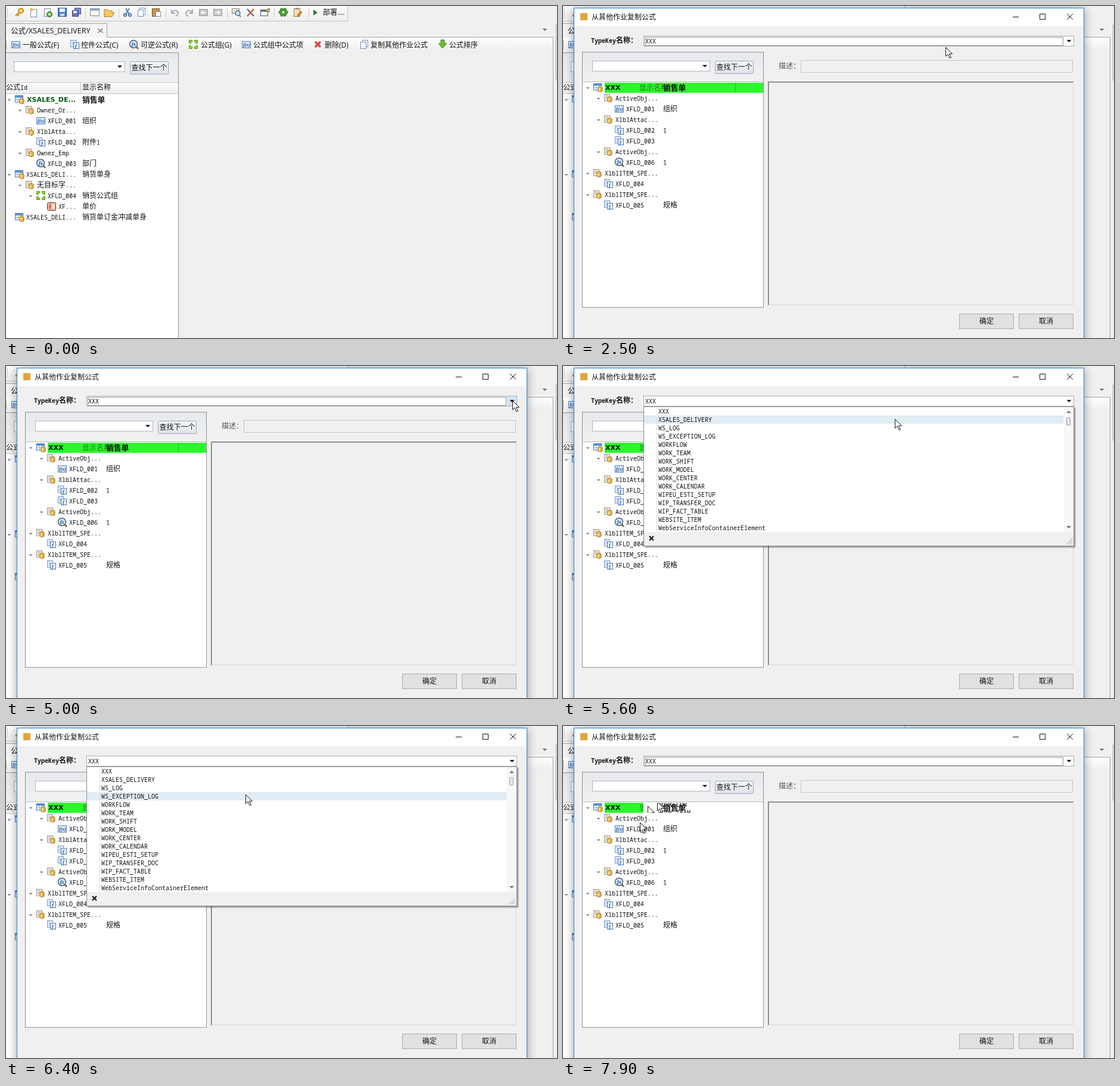
Write an HTML page that moves like this. It is 925 px wide and 558 px high and loops after 8 s.

```html
<!DOCTYPE html>
<html lang="zh">
<head>
<meta charset="utf-8">
<title>公式</title>
<style>
html,body{margin:0;width:100%;height:100%;overflow:hidden;background:#f0f0f0}
svg{display:block;width:925px;height:558px}
text{font:12px 'Open Sans','Noto Sans CJK SC','Noto Sans CJK',sans-serif;fill:#111;white-space:pre}
.mono{font-family:'Noto Sans Mono','Noto Sans CJK SC','Noto Sans CJK',monospace}
.mono .a{font-size:10px}
.semi{font-weight:600}
.bold{font:bold 11px 'DejaVu Sans',sans-serif}
.green{fill:#0a5a12}
.dim{fill:#555}
.under{fill:#157d1b}
.cjkb{font-weight:bold;font-size:12.8px}
.tab{font-size:12.6px}
.fx{font:italic bold 8px 'Liberation Serif',serif;fill:#1c4f94}
.shadow{filter:drop-shadow(0 2px 8px rgba(0,0,0,.38))}
.drop{filter:drop-shadow(2px 2px 1px rgba(0,0,0,.4))}
</style>
</head>
<body>
<svg id="stage" viewBox="0 0 925 558">
<defs>
<linearGradient id="bar" x2="0" y2="1"><stop stop-color="#fdfdfd"/><stop offset="1" stop-color="#ededee"/></linearGradient>
<linearGradient id="pane" x2="0" y2="1"><stop stop-color="#e6e9ec"/><stop offset="1" stop-color="#f1f1f2"/></linearGradient>
<linearGradient id="btn" x2="0" y2="1"><stop stop-color="#f5f6f8"/><stop offset="1" stop-color="#dfe3ea"/></linearGradient>
<linearGradient id="hotFill" x2="0" y2="1"><stop stop-color="#c4dcf5"/><stop offset="1" stop-color="#9cc5f0"/></linearGradient>
<clipPath id="rowClip"><rect x="33" y="149" width="255" height="17"/></clipPath>
<clipPath id="dlgRowClip"><rect x="135" y="129" width="90" height="17"/></clipPath>
<clipPath id="listClip"><rect x="136" y="69" width="704" height="210"/></clipPath>
</defs>
</svg>
<script>
const rect = (x, y, w, h, fill, extra = '') =>
  `<rect x="${x}" y="${y}" width="${w}" height="${h}" fill="${fill}" ${extra}/>`;
const box = (x, y, w, h, fill, stroke, extra = '') =>
  rect(x + .5, y + .5, w - 1, h - 1, fill, `stroke="${stroke}" ${extra}`);
const path = (d, fill = 'none', stroke = 'none', w = 1) =>
  `<path d="${d}" fill="${fill}" stroke="${stroke}" stroke-width="${w}"/>`;
const line = (d, color, w = 1) => path(d, 'none', color, w);
const circle = (x, y, r, fill, stroke = 'none', w = 1) =>
  `<circle cx="${x}" cy="${y}" r="${r}" fill="${fill}" stroke="${stroke}" stroke-width="${w}"/>`;
const text = (x, y, s, cls = '', extra = '') => `<text x="${x}" y="${y}" class="${cls}" ${extra}>${s}</text>`;
const mono = (x, y, s, cls = '') =>
  text(x, y, s.replace(/[ -~]+/g, m => `<tspan class="a">${m}</tspan>`), 'mono ' + cls);
const at = (x, y, s) => `<g transform="translate(${x} ${y})">${s}</g>`;
const group = (id, s) => `<g id="${id}">${s}</g>`;
const clip = (id, s) => `<g clip-path="url(#${id})">${s}</g>`;
const down = (x, y, color, r = 4) => path(`M${x - r} ${y - r / 2}h${2 * r}l${-r} ${r}z`, color);
const dotted = (x, y, w, h) => box(x, y, w, h, 'none', '#222', 'stroke-dasharray="1 1"');
const sheet = (x, y, w, h, stroke = '#6d8dbd') => box(x, y, w, h, '#fff', stroke);
const cylinder = (x, y) => at(x, y, path('M0 2q3.5-4 7 0v6q-3.5 3-7 0z', '#e8b640', '#9c6c1c') + rect(1, 3, 2, 5, '#ffe9a0'));
const rules = (x, y, w, n, color) => Array.from({length: n}, (_, i) => rect(x, y + 2 * i, w, 1, color)).join('');

const icon = {};
icon.table = box(0, 1, 14, 12, '#fff', '#4879b8') + rect(1, 2, 12, 3, '#5b95d8') +
  line('M5.5 5v8M9.5 5v8M1 8.5h12', '#86a9d3') + cylinder(8, 6);
icon.obj = sheet(0, 1, 10, 12, '#9a8a70') + rules(2, 3, 5, 4, '#b4a486') + cylinder(6, 5);
icon.fn = box(0, 2, 15, 12, '#deecfb', '#4f80bd') + text(2, 10.5, 'f(x)', 'fx');
icon.ctl = sheet(0, 0, 10, 12) + rules(2, 2, 4, 4, '#9dbbe0') + box(5, 4, 10, 11, '#e8f2fd', '#4377b5') + text(8, 13, 'f', 'fx');
icon.rev = line('M11 11l4 4', '#8a6a3c', 3) + circle(7, 7, 6.5, '#cfe0f3', '#56657a', 1.5) + text(4, 10, 'fx', 'fx');
icon.grp = [0, 9].map(x => [0, 9].map(y => box(x, y, 6, 6, '#8ccb3c', '#5b9f1d') +
  rect(x || 4, y || 4, 2, 2, '#fff')).join('')).join('');
icon.item = box(0, 1, 15, 14, '#e9c6a8', '#4e2a22', 'rx="2"') + rect(3, 4, 4, 8, '#d9756a') + rect(8, 4, 4, 8, '#f6e3b8');
icon.del = line('M2 3l9 9M11 3l-9 9', '#d8412f', 3.2);
icon.copy = sheet(3, 0, 10, 12) + sheet(0, 3, 10, 12);
icon.sort = path('M4 0h6v6h4l-7 8-7-8h4z', '#6dbb2d', '#3f8a16');
icon.save = box(0, 0, 15, 15, '#4d7fd0', '#27499a') + rect(3, 1, 9, 6, '#eaf2ff') + rect(4, 10, 7, 4, '#d5dcea');
icon.saves = at(4, 0, box(0, 0, 11, 11, '#8b8fd6', '#3f459a')) + at(0, 4, box(0, 0, 11, 11, '#6b70bd', '#3f459a') + rect(2, 1, 6, 4, '#eef'));
icon.page = sheet(2, 2, 11, 14) + circle(4, 3, 2.5, '#f2b632');
icon.plus = sheet(1, 1, 11, 14) + circle(10, 11, 4.5, '#53a93b', '#2e7420') + line('M7.5 11h5M10 8.5v5', '#fff', 1.5);
icon.key = line('M7 8l-6 6M4 11l3 2', '#d79a25', 3) + circle(10, 5, 4, '#f9dc7b', '#c98a1e', 2);
icon.win = box(0, 1, 16, 13, '#fff8df', '#7c8699') + rect(1, 2, 14, 3, '#8caedd');
icon.folder = path('M0 3h6l2 2h5v3h4l-4 7H0z', '#f5c95a', '#aa7c20');
icon.cut = line('M4 1l6 10M10 1L4 11', '#4470a8', 1.6) + [3, 11].map(x => circle(x, 12, 2.2, 'none', '#2f5ea8', 1.6)).join('');
icon.paste = box(0, 1, 13, 14, '#c99546', '#7c5720') + sheet(6, 6, 9, 9);
icon.undo = line('M2 3v6h6M2 9q7-9 11 0q0 3-4 5', '#a9a9ad', 2);
icon.back = box(0, 2, 15, 12, '#c3c3c5', '#a0a0a3') + line('M12 8H4M7 5L4 8l3 3', '#fff', 2);
icon.find = box(0, 1, 13, 9, '#f6e4a7', '#7b8db1') + circle(10, 9, 4, '#cfe3fa', '#3a6cb4', 1.5) + line('M12 12l3 3', '#a86b23', 2);
icon.tools = line('M2 2l11 12', '#5b6c86', 2.5) + line('M13 2L2 14', '#d15b3c', 2.5);
icon.props = sheet(0, 3, 13, 11, '#46546d') + rect(1, 4, 11, 3, '#5f86c5') + path('M7 5l8-4v6z', '#edbd62', '#725226');
icon.flower = Array.from({length: 6}, (_, i) =>
  circle(7.5 + 5 * Math.cos(i * Math.PI / 3), 7.5 + 5 * Math.sin(i * Math.PI / 3), 2.5, '#4dac32', '#2d7a1b')).join('') + circle(7.5, 7.5, 2, '#d9f3bd');
icon.clip = box(1, 1, 11, 14, '#f3e2bd', '#a37228') + rect(4, 0, 5, 3, '#8d98ab') + path('M7 12l6-6 2 2-6 6z', '#e8963a', '#8d5417');
icon.play = path('M0 3l7 5-7 5z', '#2c7a36');
const mirrored = name => `<g transform="matrix(-1 0 0 1 15 0)">${icon[name]}</g>`;
icon.redo = mirrored('undo');
icon.next = mirrored('back');
const put = (name, x, y) => at(x, y, icon[name]);

// Row: "level icon id label", a leading + marks an expanded node
function tree(rows, dx, y0, labelX) {
  return rows.trim().split('\n').map((row, i) => {
    const [, open, level, ic, id, label = ''] = row.trim().match(/^(\+?)(\d) (\S+) (\S+) ?(.*)$/);
    const y = y0 + 18 * i, x = dx + 18 * level;
    return (open ? down(x + 5.5, y + 1, '#7d7d7d', 3) : '') + put(ic, x + 15, y - 8) +
      (i ? mono(x + 34, y + 4, id) + mono(labelX, y + 4, label)
         : text(x + 35, y + 4, id, dx ? 'bold' : 'bold green') + text(labelX, y + 5, label, 'cjkb'));
  }).join('');
}
const mainRows = `
+0 table XSALES_DE... 销售单
+1 obj Owner_Or...
2 fn XFLD_001 组织
+1 obj XlblAtta...
2 ctl XFLD_002 附件1
+1 obj Owner_Emp
2 rev XFLD_003 部门
+0 table XSALES_DELI... 销货单身
+1 obj 无目标字...
+2 grp XFLD_004 销货公式组
3 item XF... 单价
0 table XSALES_DELI... 销货单订金冲减单身`;
const dialogRows = `
+0 table XXX 销售单
+1 obj ActiveObj...
2 fn XFLD_001 组织
+1 obj XlblAttac...
2 ctl XFLD_002 1
2 ctl XFLD_003
+1 obj ActiveObj...
2 rev XFLD_006 1
+0 obj XlblITEM_SPE...
1 ctl XFLD_004
+0 obj XlblITEM_SPE...
1 ctl XFLD_005 规格`;
const options = `XXX XSALES_DELIVERY WS_LOG WS_EXCEPTION_LOG WORKFLOW WORK_TEAM WORK_SHIFT WORK_MODEL WORK_CENTER
WORK_CALENDAR WIPEU_ESTI_SETUP WIP_TRANSFER_DOC WIP_FACT_TABLE WEBSITE_ITEM WebServiceInfoContainerElement`.split(/\s+/);
const optionText = options.map((s, i) => mono(160, 80 + 14 * i, s)).join('');

const search = (x, y, w) => box(x, y, w, 18, '#fff', '#b4b8be') + down(x + w - 9, y + 9, '#111') +
  box(x + w + 8, y, 65, 22, 'url(#btn)', '#9ba5b6', 'rx="2"') + text(x + w + 10.5, y + 15, '查找下一个');
const pointer = path('M.5.5v15l3.6-3.4 3 6.6 2.4-1-3-6.4h5z', '#fff', '#111');
const stroke = line('M.5.5v15L4 12M1 1l11 11', '#111') + line('M3 1l10 10', '#1b9a24', 2);

// Toolbar sections: left edge, then icons 24 px apart
const sections = [[15, 'key page plus save saves'], [141, 'win folder'], [197, 'cut copy paste'],
  [276, 'undo redo back next'], [379, 'find tools props'], [458, 'flower clip'], [516, 'play']];
const topBar = rect(0, 0, 574, 26, 'url(#bar)') + line('M0 25.5h573.5V0', '#c3c5c8') +
  sections.map(([x, names], i) => rect(i ? x - 8 : 2, 3, 1, 17, '#c8c8c8') +
    names.split(' ').map((n, k) => put(n, x + 24 * k, 3)).join('')).join('') + text(532, 15, '部署....');

const commands = [['fn', 9, 28, '一般公式(F)'], ['ctl', 108, 126, '控件公式(C)'], ['rev', 207, 226, '可逆公式(R)'],
  ['grp', 307, 327, '公式组(G)'], ['fn', 396, 415, '公式组中公式项'], ['del', 517, 535, '删除(D)'],
  ['copy', 595, 612, '复制其他作业公式'], ['sort', 726, 744, '公式排序']];
const commandBar = rect(0, 53, 917, 25, 'url(#bar)') + rect(0, 30, 169, 23, '#f5f5f6') +
  line('M0 29.5h169.5v23H918.5V558', '#a0a3a8') + text(8, 46, '公式/XSALES_DELIVERY', 'tab') +
  line('M154.5 38l8 7m0-7l-8 7', '#777', 1.6) + down(904.5, 40, '#777') + box(923, 32, 5, 93, '#fff', '#9c9ea2') +
  group('hot', box(589, 53, 132, 25, 'url(#hotFill)', '#3a7dc4')) + rect(0, 58, 1, 15, '#aaa') +
  commands.map(([n, x, tx, s]) => put(n, x, 57) + text(tx, 70, s)).join('');

const mainTree = rect(0, 79, 289, 49, 'url(#pane)') + search(13, 93, 187) + rect(0, 128, 289, 430, '#fff') +
  rect(0, 129, 289, 18, 'url(#bar)') + line('M0 128.5h289m0 19H0M125.5 128v19', '#c6c8cc') +
  line('M0 78.5h289.5V558', '#8f9296') + mono(0, 141, '公式Id') + text(128, 141, '显示名称') +
  tree(mainRows, 0, 157, 128) + group('focus', dotted(32, 148, 94, 18) + dotted(125, 148, 164, 18)) +
  clip('rowClip', group('trailA', at(222, 155, stroke)) + group('trailB', at(249, 150, pointer)));

const dropdown = box(135, 68, 723, 235, '#fff', '#8a8a94', 'class="drop"') +
  rect(136, 69, 704, 14, '#e1ecf4', 'id="pick"') + rect(157, 69, 1, 210, '#dedede') +
  clip('listClip', optionText) + rect(840, 69, 17, 210, '#f8f8f9') + down(849, 77, '#777', -4) + down(849, 271, '#777') +
  box(845, 86, 7, 14, '#e4e5ed', '#9a9cac', 'rx="2"') + rect(136, 279, 721, 23, '#f0f0f0') +
  line('M145 286l7 7m0-7l-7 7', '#111', 2.2) + line('M845 300l10-10m-6 10l6-6m-2 6l2-2', '#999');

const frame = box(18, 3, 857, 600, '#f0f0f0', '#2588cf', 'class="shadow"') + rect(19, 4, 855, 30, '#fff') +
  rect(29, 12, 12, 12, '#e5a43a') + text(48, 23, '从其他作业复制公式') +
  line('M755 18.5h10M800.500 13.5h9v9h-9zM846 13l10 10m0-10l-10 10', '#111');
const combo = mono(47, 62, 'TypeKey名称：', 'semi') + box(135, 50, 723, 18, '#fff', '#a9adb3') +
  rect(841, 51, 16, 16, '#cfe5f8', 'id="arrowHot"') + group('comboFocus', dotted(137, 52, 703, 15)) +
  mono(138, 63, 'XXX') + down(849.5, 59, '#111');
const dialogTree = box(32, 77, 305, 430, '#fff', '#8f9296') + rect(33, 78, 303, 49, 'url(#pane)') + search(49, 92, 198) +
  rect(33, 127, 303, 1, '#b5b8bc') + rect(70, 129, 266, 17, '#2cf82c') + text(128, 142, '显示名称', 'under') +
  rect(289, 129, 1, 17, '#1fc525') +
  group('residue', rect(135, 129, 201, 17, '#fff') + clip('dlgRowClip', optionText +
    group('trailC', at(158, 127, pointer)) + group('trailD', at(142, 134, pointer)))) +
  tree(dialogRows, 36, 137, 168);
const pushButton = (x, s) => box(x, 517, 92, 26, '#e1e1e1', '#adadad') + text(x + 46, 534, s, '', 'text-anchor="middle"');
const detail = text(362, 105, '描述：', 'dim') + box(399, 91, 457, 21, '#f0f0f0', '#c3c3c3') +
  line('M344.5 503V127.5H857', '#777') + line('M345.5 502V128.5H856', '#a5a5a5') + line('M345 502.5h511.5V128', '#d6d6d6') +
  pushButton(665, '确定') + pushButton(765, '取消');

document.getElementById('stage').insertAdjacentHTML('beforeend',
  rect(0, 0, 925, 558, '#f0f0f0') + topBar + commandBar + mainTree +
  group('dialog', frame + combo + dialogTree + detail + group('list', dropdown)) + group('cursor', pointer));

// Pointer moves: first and last step in ms, from x y, to x y
const moves = [
  [100, 600, 640, 66, 222, 155], [800, 1200, 249, 150, 647, 70], [2400, 2500, 645, 70, 642, 69],
  [3300, 3600, 652, 68, 695, 63], [4000, 4000, 692, 63, 692, 63], [4300, 5000, 698, 63, 850, 58],
  [5300, 5600, 830, 63, 557, 89], [5700, 6000, 540, 87, 500, 78], [6100, 6400, 490, 79, 402, 115],
  [6500, 6700, 330, 160, 148, 280], [7100, 7400, 162, 240, 158, 127], [7500, 7600, 151, 129, 142, 134],
  [7700, 7800, 136, 147, 131, 157], [7900, 7900, 129, 162, 129, 162]];
function pointerAt(t) {
  const move = moves.findLast(m => m[0] <= t);
  if (!move) return [-50, -50];
  const [t0, t1, x0, y0, x1, y1] = move;
  const p = t1 > t0 ? Math.min(1, (Math.floor(t / 100) * 100 - t0) / (t1 - t0)) : 1;
  return [Math.round(x0 + (x1 - x0) * p), Math.round(y0 + (y1 - y0) * p)];
}

const opening = [[1900, 1, 1], [1800, .8, .985], [1700, .4, .95]];
const $ = id => document.getElementById(id);
const show = (id, on) => { $(id).style.display = on ? '' : 'none'; };

function render(t) {
  const [x, y] = pointerAt(t);
  const listOpen = t >= 5200 && t < 7000;
  const [, alpha, scale] = opening.find(s => t >= s[0]) || [0, 0, 1];
  $('cursor').setAttribute('transform', `translate(${x} ${y})`);
  $('dialog').setAttribute('opacity', alpha);
  $('dialog').setAttribute('transform', `translate(446 300) scale(${scale}) translate(-446 -300)`);
  $('pick').setAttribute('y', 69 + 14 * Math.max(0, Math.min(14, Math.floor((y - 69) / 14))));
  show('hot', t < 1900 && x >= 589 && x < 721 && y >= 53 && y < 78);
  show('focus', t >= 600);
  show('trailA', t >= 800);
  show('trailB', t >= 900);
  show('dialog', alpha > 0);
  show('list', listOpen);
  show('comboFocus', !listOpen);
  show('arrowHot', t > 4000 && t < 5200 && x >= 841);
  show('residue', t >= 7000);
  show('trailC', t >= 7500);
  show('trailD', t >= 7700);
}
const start = performance.now();
function tick() {
  render((performance.now() - start) % 8000);
  requestAnimationFrame(tick);
}
tick();
</script>
</body>
</html>
```
